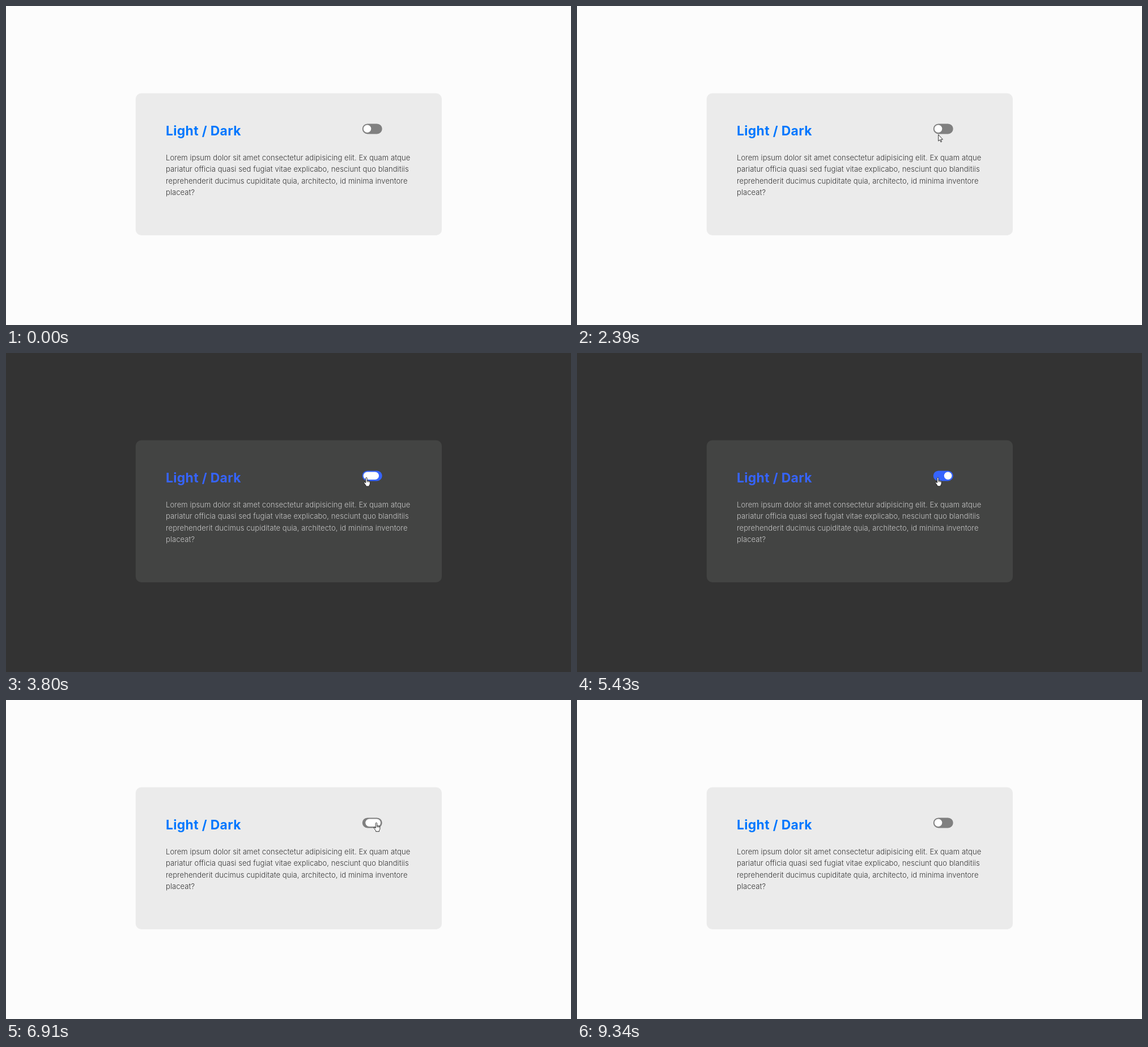
These frames come from a looping animation (997x562 px, 9420 ms). An HTML page with a canvas:

```html
<!DOCTYPE html>
<html lang="en">
<head>
<meta charset="utf-8">
<title>Light / Dark</title>
<style>
  html, body { margin: 0; width: 100%; height: 100%; overflow: hidden; background: #fcfcfc; }
  canvas { display: block; width: 997px; height: 562px; }
</style>
</head>
<body>
<canvas id="stage" width="997" height="562"></canvas>
<script>
const ctx = document.getElementById('stage').getContext('2d');
const LOOP = 9420;

const LIGHT = { page: '#fcfcfc', card: '#ebebeb', title: '#0077ff', text: '#363636', track: '#808080' };
const DARK = { page: '#333333', card: '#434443', title: '#3664ff', text: '#c6c6c6', track: '#3664ff' };

const LINES = [
  'Lorem ipsum dolor sit amet consectetur adipisicing elit. Ex quam atque',
  'pariatur officia quasi sed fugiat vitae explicabo, nesciunt quo blanditiis',
  'reprehenderit ducimus cupiditate quia, architecto, id minima inventore',
  'placeat?'
];

// Knob poses: time, left edge, right edge
const KNOB = [
  [0, 630.7, 644.3],
  [3640, 630.7, 645.5], [3720, 630.7, 652], [3800, 630.7, 658], [3880, 636, 660.5],
  [3950, 642, 661.4], [4030, 646.5, 661.4], [4110, 647.8, 661.4],
  [6750, 645, 661.4], [6830, 633.7, 660.6], [6910, 634.3, 661], [6990, 631.5, 655.5],
  [7070, 630.7, 649], [7140, 630.7, 645.5], [7220, 630.7, 644.3]
];

const linear = p => p;
const easeOut = p => 1 - (1 - p) ** 2;
const smooth = p => p * p * (3 - 2 * p);
const power = n => p => p ** n;

// Pointer moves; each is sampled in even steps like a screen recording
const MOVES = [
  { start: 530, end: 1460, steps: 13, from: [979, 550], to: [707, 338], ease: [linear, power(1.4)] },
  { start: 1540, end: 2470, steps: 13, from: [707, 338], to: [636, 224], ease: [easeOut, easeOut] },
  { start: 2550, end: 2790, steps: 4, from: [636, 224], to: [636, 219.5], ease: [linear, easeOut] },
  { start: 5430, end: 5980, steps: 8, from: [636, 219.5], to: [653.5, 216.3], ease: [smooth, smooth] },
  { start: 7620, end: 8560, steps: 13, from: [653.5, 216.3], to: [936, 526], ease: [power(1.15), linear] }
];

const ARROW = new Path2D('M0 0V11.2L2.6 8.9L4.3 13L5.9 12.3L4.2 8.4H7.8Z');
const HAND = new Path2D(
  'M-1.3 9.6V1.2Q-1.2 0 0 0Q1.2 0 1.2 1.2V5.2Q2.1 4.3 3 5.5Q4.1 4.8 4.8 6' +
  'Q6.4 5.7 6.4 7.3V10.5Q6.3 12.3 5 13.6V15.4H-.9V14L-3.6 10.2' +
  'Q-5 8.3-3.8 7.8Q-2.8 7.5-1.3 9.6Z');
const FINGERS = new Path2D('M1.2 5V8M3 5.5V8M4.8 6V8.3');

function pill(left, top, right, bottom, radius, color) {
  ctx.fillStyle = color;
  ctx.beginPath();
  ctx.roundRect(left, top, right - left, bottom - top, radius);
  ctx.fill();
}

function write(lines, y, lineHeight, font, spacing, color) {
  ctx.font = font;
  ctx.letterSpacing = spacing;
  ctx.fillStyle = color;
  lines.forEach((line, i) => ctx.fillText(line, 282, y + i * lineHeight));
}

function pointerAt(t) {
  if (t < 370 || (t >= 8720 && t < 9180) || t >= 9340) return null;
  if (t >= 9180) return [979, 549];
  if (t >= 8640) return [962, 548];
  const move = MOVES.findLast(m => t >= m.start);
  if (!move) return MOVES[0].from;
  const interval = (move.end - move.start) / (move.steps - 1);
  const step = Math.floor((t - move.start) / interval + 0.001) + 1;
  const p = Math.min(1, step / move.steps);
  return move.from.map((a, i) => a + (move.to[i] - a) * move.ease[i](p));
}

function drawPointer([x, y]) {
  const overToggle = x > 629 && x < 664 && y > 207 && y < 225.5;
  const shape = overToggle ? HAND : ARROW;
  ctx.save();
  ctx.translate(x, y);
  ctx.lineJoin = 'round';
  ctx.lineWidth = 0.85;
  ctx.fillStyle = '#ffffff';
  ctx.strokeStyle = '#111111';
  ctx.fill(shape);
  ctx.stroke(shape);
  if (overToggle) ctx.stroke(FINGERS);
  ctx.restore();
}

function drawClick(x, y, alpha) {
  ctx.fillStyle = `rgba(255, 255, 0, ${alpha})`;
  ctx.beginPath();
  ctx.arc(x, y, 8.3, 0, Math.PI * 2);
  ctx.fill();
}

function draw(t) {
  const theme = t >= 3800 && t < 6910 ? DARK : LIGHT;
  ctx.fillStyle = theme.page;
  ctx.fillRect(0, 0, 997, 562);
  pill(228.8, 153.8, 769, 404, 10, theme.card);

  write(['Light / Dark'], 228, 0, '700 22.8px Inter, sans-serif', '0.38px', theme.title);
  write(LINES, 271.5, 20.6, '300 13px Inter, sans-serif', '0.08px', theme.text);

  pill(628.8, 207.4, 663.7, 225.4, 9, theme.track);
  const [, left, right] = KNOB.findLast(pose => t >= pose[0]);
  pill(left, 209.4, right, 223, 6.8, '#ffffff');

  if (t >= 3640 && t < 3800) drawClick(636.5, 219, 0.65);
  if (t >= 6750 && t < 6910) drawClick(653.2, 216.3, 0.48);
  const pointer = pointerAt(t);
  if (pointer) drawPointer(pointer);
}

const began = performance.now();
function tick() {
  draw((performance.now() - began) % LOOP);
  requestAnimationFrame(tick);
}
tick();
</script>
</body>
</html>
```
